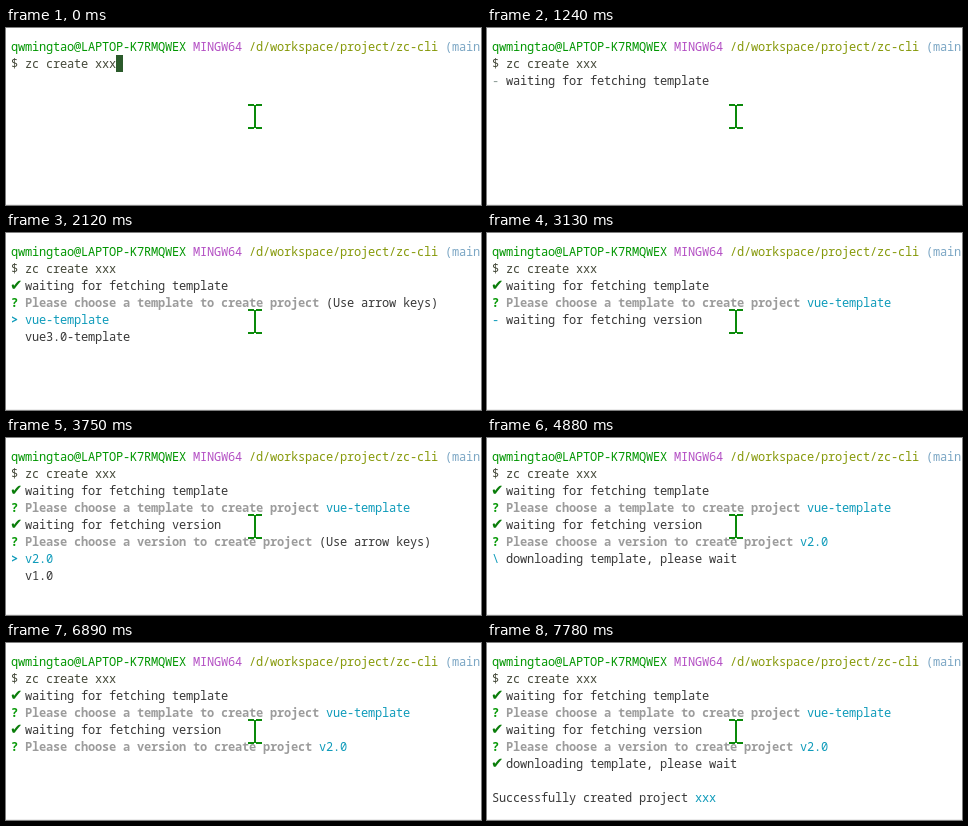
An HTML page for the animation above (8530 ms loop, 475 by 177 pixels).

```html
<!DOCTYPE html>
<html lang="en">
<head>
<meta charset="utf-8">
<title>Terminal</title>
<style>
html, body { margin: 0; width: 100%; height: 100%; overflow: hidden; background: #fff; }
#stage { position: relative; width: 475px; height: 177px; overflow: hidden; }
#term {
  position: absolute; left: 5px; top: 10px; margin: 0; color: #383838;
  font: 12px/17px "Noto Sans Mono", monospace; letter-spacing: -.2px;
  font-variant-ligatures: none;
}
#term div { height: 17px; }
.user { color: #009600; font-weight: 500; }
.host { color: #b450c4; }
.path { color: #86990a; font-weight: 500; }
.git { color: #7ba6c4; font-weight: 500; }
.cmd { color: #45493a; }
.cyan { color: #0f9bba; }
.dash { color: #8a9a94; }
.arrow { color: #0f9bba; font-weight: bold; }
.ask { color: #0a9a0a; font-weight: bold; }
.grey { color: #9c9c9c; font-weight: bold; }
.tick {
  display: inline-block; width: 14px; height: 17px; vertical-align: top;
  color: #0a7d0a; font: 15px/17px "DejaVu Sans", sans-serif; text-indent: -1px;
}
.block {
  display: inline-block; width: 7px; height: 17px; vertical-align: top;
  background: #2b5a2b;
}
svg { position: absolute; left: 0; top: 0; }
</style>
</head>
<body>
<div id="stage">
  <pre id="term"></pre>
  <svg width="475" height="177">
    <path d="M242 77h6m2 0h6M249 77v23M242 100h6m2 0h6" fill="none" stroke="#0a8a0a" stroke-width="2"/>
    <path d="M0 176.5h475" stroke="#ebebeb"/>
  </svg>
</div>
<script>
const LOOP = 8530;
const term = document.getElementById('term');

// Spinner runs: first step, last step, glyphs (a space clears the row)
const runs = [
  [1240, 1870, '-\\|/-\\'],
  [2010, 2010, '|'],
  [3130, 3500, '-\\|/'],
  [4250, 4880, '-\\|/-\\'],
  [5130, 5760, '/-\\|/-'],
  [5900, 6400, '|/-\\|'],
  [6650, 6890, '/- '],
  [7140, 7510, '|/-\\'],
  [7650, 7650, '|']
];

const span = (cls, text) => `<span class="${cls}">${text}</span>`;
const block = span('block', '');
const done = text => span('tick', '✔') + text;

function spin(t, text, cls = 'cyan') {
  const [from, to, glyphs] = runs.filter(r => r[0] <= t).pop();
  const last = glyphs.length - 1;
  const i = last ? Math.min(last, Math.floor((t - from) / (to - from) * last + 1e-6)) : 0;
  return glyphs[i] === ' ' ? '' : span(cls, glyphs[i]) + ' ' + text;
}

function ask(what, options, answered) {
  const head = span('ask', '?') + ' ' +
    span('grey', `Please choose a ${what} to create project`) + ' ';
  return answered
    ? [head + span('cyan', options[0])]
    : [head + '(Use arrow keys)', span('arrow', '&gt;') + ' ' + span('cyan', options[0]), '  ' + options[1]];
}

function rows(t) {
  const out = [
    span('user', 'qwmingtao@LAPTOP-K7RMQWEX') + ' ' + span('host', 'MINGW64') + ' ' +
      span('path', '/d/workspace/project/zc-cli') + ' ' + span('git', '(main)'),
    span('cmd', '$ zc create xxx') + (t < 360 ? block : '')
  ];
  if (t < 360) return out;
  if (t < 1240) return [...out, block];

  const fetchTemplate = 'waiting for fetching template';
  if (t < 2120) return [...out, spin(t, fetchTemplate, 'dash')];
  out.push(done(fetchTemplate), ...ask('template', ['vue-template', 'vue3.0-template'], t >= 3130));
  if (t < 3130) return out;

  const fetchVersion = 'waiting for fetching version';
  if (t < 3750) return [...out, spin(t, fetchVersion)];
  out.push(done(fetchVersion), ...ask('version', ['v2.0', 'v1.0'], t >= 4250));
  if (t < 4250) return out;

  const download = 'downloading template, please wait';
  if (t < 7780) return [...out, spin(t, download)];
  return [...out, done(download), '', 'Successfully created project ' + span('cyan', 'xxx')];
}

let shown = '';
function draw() {
  const html = rows(performance.now() % LOOP).map(r => `<div>${r}</div>`).join('');
  if (html !== shown) term.innerHTML = shown = html;
  requestAnimationFrame(draw);
}
draw();
</script>
</body>
</html>
```
